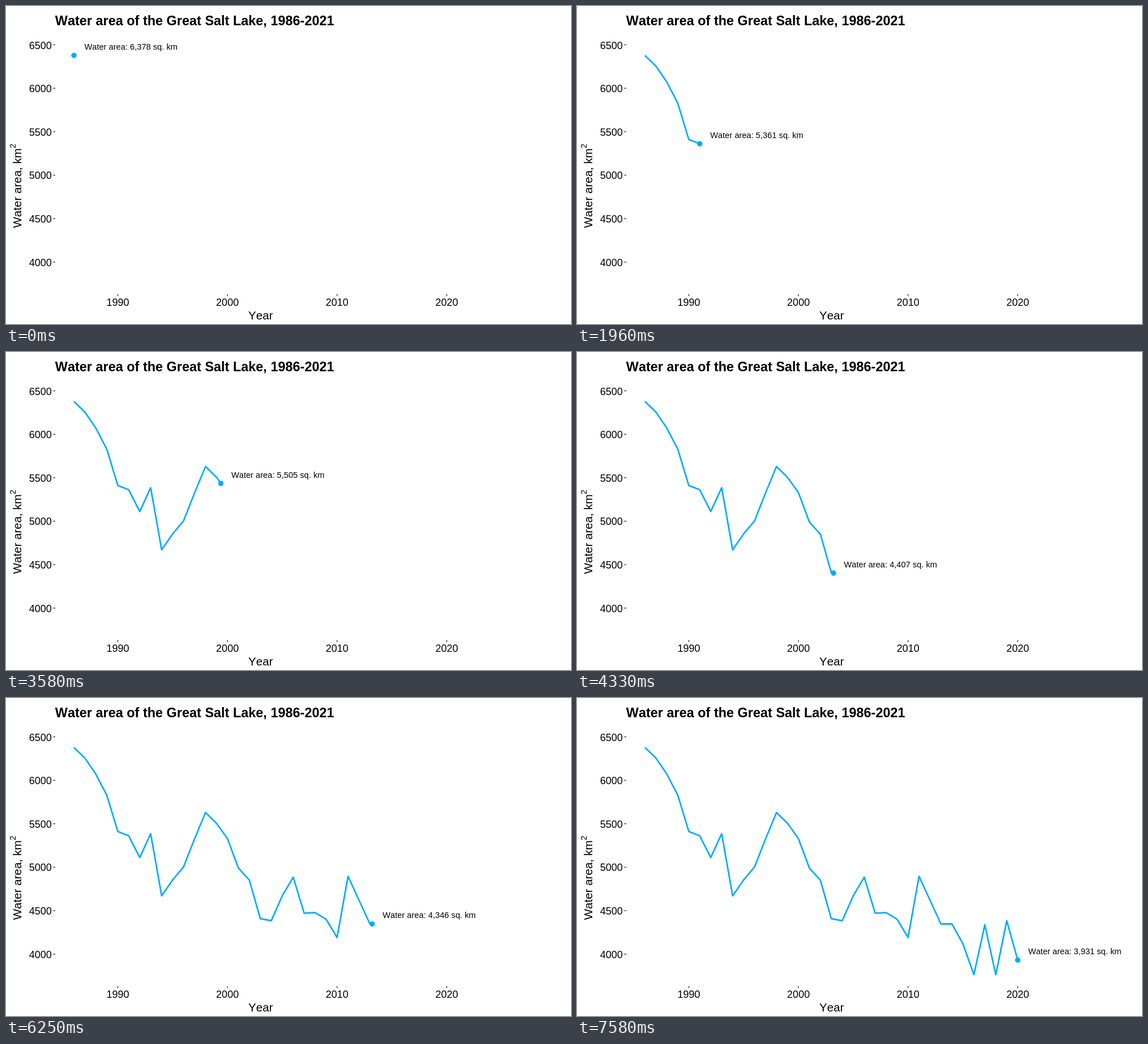
Recreate the animation shown at these times as an HTML page. Size 998 px wide and 561 px high, loop 8620 ms.

```html
<!DOCTYPE html>
<html lang="en">
<head>
<meta charset="utf-8">
<title>Water area chart</title>
<style>
  html, body { margin: 0; width: 100%; height: 100%; overflow: hidden; background: #fff; }
  svg { display: block; width: 100%; height: 100%; }
  text { font-family: "Liberation Sans", Arial, sans-serif; font-kerning: none; white-space: pre; }
  .title { font-size: 23.46px; font-weight: bold; }
  .axis-title { font-size: 20.57px; }
  .tick-label { font-size: 18px; }
  .label { font-size: 14.66px; }
  .ticks { stroke: #333; stroke-width: 1.37; }
  .series { fill: none; stroke: #00aaff; stroke-width: 2.7; stroke-linejoin: round; }
  .dot { fill: #00aaff; }
</style>
</head>
<body>
<svg viewBox="0 0 998 561">
  <text class="title" x="86.8" y="34">Water area of the Great Salt Lake, 1986-2021</text>
  <text class="axis-title" x="449.8" y="553.3" text-anchor="middle">Year</text>
  <text class="axis-title" transform="translate(27 391.6) rotate(-90)">Water area, km<tspan dy="-9.7" font-size="14.4">2</tspan></text>
  <g id="axes"></g>
  <polyline id="series" class="series"/>
  <circle id="dot" class="dot" r="4.75"/>
  <text id="label" class="label"></text>
</svg>
<script>
const FIRST_YEAR = 1986;
const AREAS = [
  6378, 6255, 6071, 5828, 5411, 5361, 5111, 5385, 4670, 4853, 5004, 5325,
  5629, 5505, 5329, 4990, 4850, 4407, 4384, 4670, 4885, 4471, 4477, 4400,
  4191, 4895, 4620, 4346, 4348, 4119, 3764, 4337, 3762, 4384, 3931
];
const LAST = AREAS.length - 1;
const LOOP = 8620, HOLD = 1000, STEPS = 158, STEPS_PER_MS = 24 / 1000;

const byId = id => document.getElementById(id);
const series = byId("series"), dot = byId("dot"), label = byId("label");

const xOf = index => 120 + index * 19.367;
const yOf = area => 68.5 + (6500 - area) * 0.1533;

// Each year is reached on a whole step.
const stepOf = index => Math.round(index * STEPS / LAST);

function drawAxes() {
  let markup = "";
  for (let area = 4000; area <= 6500; area += 500) {
    const y = yOf(area);
    markup += `<path class="ticks" d="M83.4 ${y}H87"/>
      <text class="tick-label" x="80.8" y="${y + 7}" text-anchor="end">${area}</text>`;
  }
  for (let year = 1990; year <= 2020; year += 10) {
    const x = xOf(year - FIRST_YEAR);
    markup += `<path class="ticks" d="M${x} 508.2V511.8"/>
      <text class="tick-label" x="${x}" y="528.5" text-anchor="middle">${year}</text>`;
  }
  byId("axes").innerHTML = markup;
}

function stepAt(ms) {
  const tick = Math.floor((ms % LOOP) / 10) * 10;
  const step = Math.floor((tick + 4.9 - HOLD) * STEPS_PER_MS);
  return Math.max(0, Math.min(STEPS, step));
}

function draw(ms) {
  const step = stepAt(ms);
  let index = 0;
  while (index < LAST - 1 && stepOf(index + 1) <= step) index++;

  const start = stepOf(index);
  const part = (step - start) / (stepOf(index + 1) - start);
  const x = xOf(index + part);
  const y = yOf(AREAS[index] + (AREAS[index + 1] - AREAS[index]) * part);

  const points = AREAS.slice(0, index + 1).map((area, i) => [xOf(i), yOf(area)]);
  series.setAttribute("points", [...points, [x, y]].join(" "));
  dot.setAttribute("cx", x);
  dot.setAttribute("cy", y);
  label.setAttribute("x", x + 18.4);
  label.setAttribute("y", y - 10.2);

  const nearest = AREAS[part < 0.5 ? index : index + 1];
  label.textContent = `Water area: ${nearest.toLocaleString("en-US")} sq. km`;
}

function play() {
  draw(performance.now());
  requestAnimationFrame(play);
}

drawAxes();
play();
</script>
</body>
</html>
```
